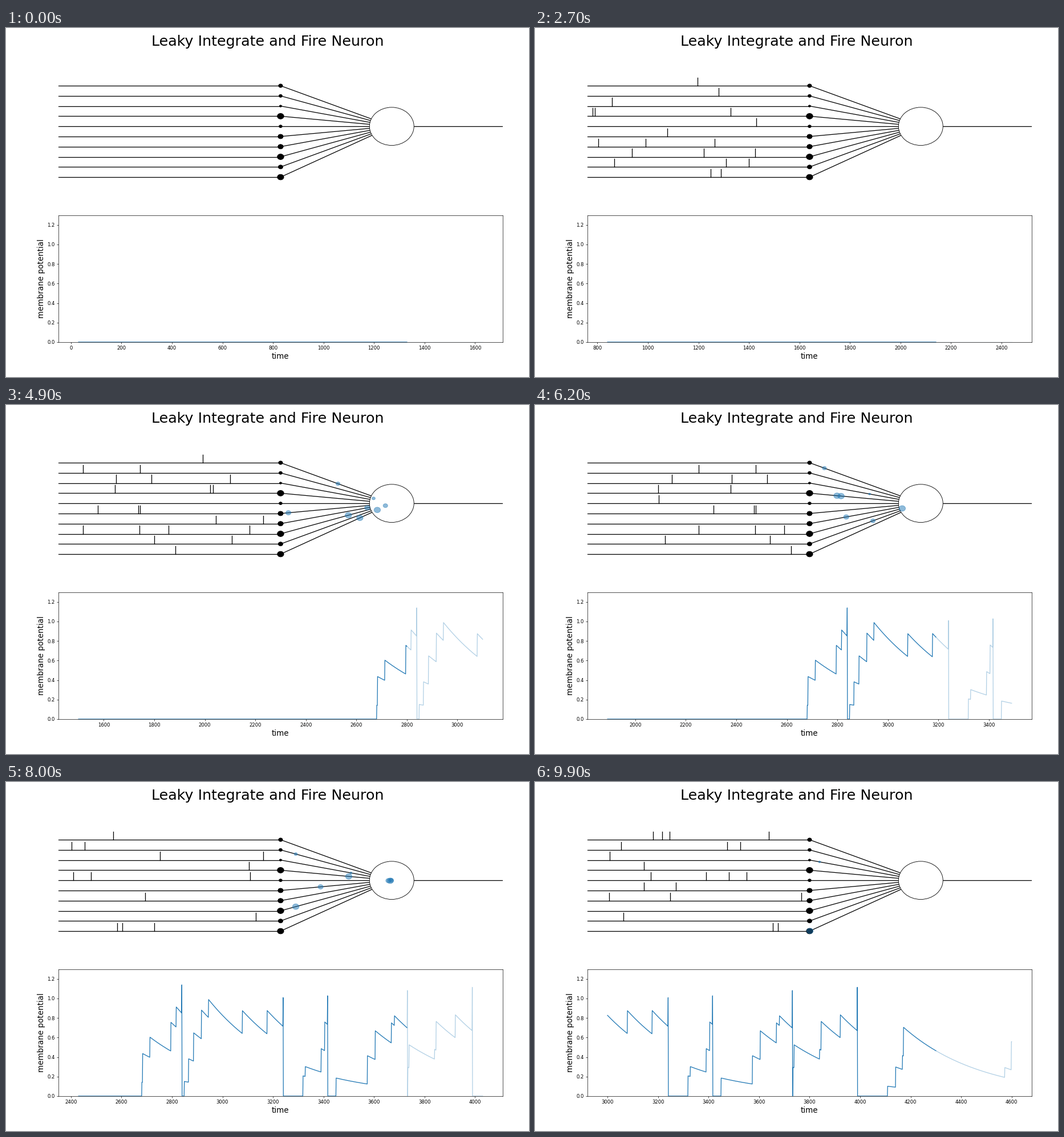
A matplotlib script for the animation above (10000 ms loop, 917 by 611 pixels).

```python
import matplotlib.pyplot as plt
import numpy as np
from matplotlib.animation import FuncAnimation
from matplotlib.patches import Ellipse

DPI = 61.1
FRAMES, INTERVAL = 100, 100
STEP = 30                        # model time per frame
AXON, DENDRITE = 1000, 300       # travel times
DELAY = AXON + DENDRITE
DECAY = np.exp(-0.00325)
END = 4600
SYN_X, SOMA_X, SOMA_Y = 0.5, 0.75, 5
SOMA_W, SOMA_H = 0.1, 3.75
SPIKE_H = 0.8

# synaptic weight and spike times of each input, top to bottom
INPUTS = [
    (0.185, (1645, 2150, 3482, 3931, 3963, 4005)),
    (0.150, (1549, 2432, 2689, 3611, 3670, 4148)),
    (0.101, (2028, 2381, 2540, 2809, 3273, 4198)),
    (0.295, (1496, 2105, 2116, 2546, 2872, 4046)),
    (0.142, (1381, 2868, 3583, 3662, 3766, 4014)),
    (0.235, (1779, 2432, 2439, 2622, 3902, 4045)),
    (0.240, (1566, 1877, 2091, 3338, 3928, 4203)),
    (0.295, (1384, 1617, 1940, 2305, 2434, 2689)),
    (0.207, (1413, 1517, 2019, 2369, 2841, 4138)),
    (0.290, (1539, 1586, 2274, 3299, 3441, 3465)),
]


def simulate():
    """Membrane potential at every time step, and the firing times."""
    drive = np.zeros(END + 1)
    for weight, times in INPUTS:
        for s in times:
            if s + DELAY <= END:
                drive[s + DELAY] += weight
    v, fired = np.zeros(END + 1), []
    for t in range(1, END + 1):
        if v[t - 1] >= 1:
            continue
        v[t] = v[t - 1] * DECAY + drive[t]
        if v[t] >= 1:
            fired.append(t)
    return v, fired


def blob(x, y, scale, **style):
    return top.add_patch(Ellipse((x, y), SOMA_W * scale, SOMA_H * scale, **style))


def set_ticks(line, points):
    """Show a short upright stroke at each (x, y)."""
    xs, ys = [], []
    for x, y in points:
        xs += [x, x, np.nan]
        ys += [y, y + SPIKE_H, np.nan]
    line.set_data(xs, ys)


potential, fired = simulate()
time = np.arange(END + 1)

fig, (top, plot) = plt.subplots(2, 1, figsize=(917.01 / DPI, 611.01 / DPI), dpi=DPI)
fig.subplots_adjust(left=0.1, right=0.95, bottom=0.1, top=0.9, hspace=0.2)
fig.suptitle("Leaky Integrate and Fire Neuron", fontsize=30)

top.set(xlim=(0, 1), ylim=(-1.25, 11.25))
top.axis("off")
dots = []
for row, (weight, times) in enumerate(INPUTS):
    y = 9 - row
    top.plot([0, SYN_X], [y, y], color="black", zorder=1)
    top.plot([SYN_X, SOMA_X], [y, SOMA_Y], color="black", zorder=1)
    blob(SYN_X, y, weight / 2, color="black", zorder=4)
    for s in times:
        dot = blob(SYN_X, y, weight / 2, color="tab:blue", alpha=0.5, zorder=5)
        dots.append((dot, s, y))
top.plot([SOMA_X, 1], [SOMA_Y, SOMA_Y], color="black", zorder=1)
blob(SOMA_X, SOMA_Y, 1, facecolor="white", edgecolor="black", zorder=3)
in_spikes, = top.plot([], [], color="black", zorder=2)
out_spikes, = top.plot([], [], color="tab:red", zorder=2)

plot.set_ylim(0, 1.3)
plot.set_xlabel("time", fontsize=16)
plot.set_ylabel("membrane potential", fontsize=16)
past, = plot.plot([], [], color="tab:blue")
future, = plot.plot([], [], color="tab:blue", alpha=0.35)
fire_line = plot.axvline(0, color="tab:red", visible=False)


def update(i):
    start = STEP * i
    now = start + STEP + DELAY
    plot.set_xlim(start - 50, start + 1710)
    seen, ahead = slice(start + STEP, now + 1), slice(now, now + DENDRITE + 1)
    past.set_data(time[seen], potential[seen])
    future.set_data(time[ahead], potential[ahead])

    on_axon = []
    for dot, s, y in dots:
        age = now - s
        if 0 <= age < AXON:
            on_axon.append((SYN_X * age / AXON, y))
        p = (age - AXON) / DENDRITE
        dot.set_visible(0 <= p < 1)
        dot.set_center((SYN_X + (SOMA_X - SYN_X) * p, y + (SOMA_Y - y) * p))
    set_ticks(in_spikes, on_axon)

    leaving = [t for t in fired if 0 <= now - t < DENDRITE]
    set_ticks(out_spikes, [(SOMA_X + (1 - SOMA_X) * (now - t) / DENDRITE, SOMA_Y)
                           for t in leaving])
    fire_line.set_visible(bool(leaving))
    if leaving:
        fire_line.set_xdata([leaving[-1]] * 2)
    return []


anim = FuncAnimation(fig, update, frames=FRAMES, interval=INTERVAL,
                     repeat=True, repeat_delay=0, blit=False)
plt.show()
```
